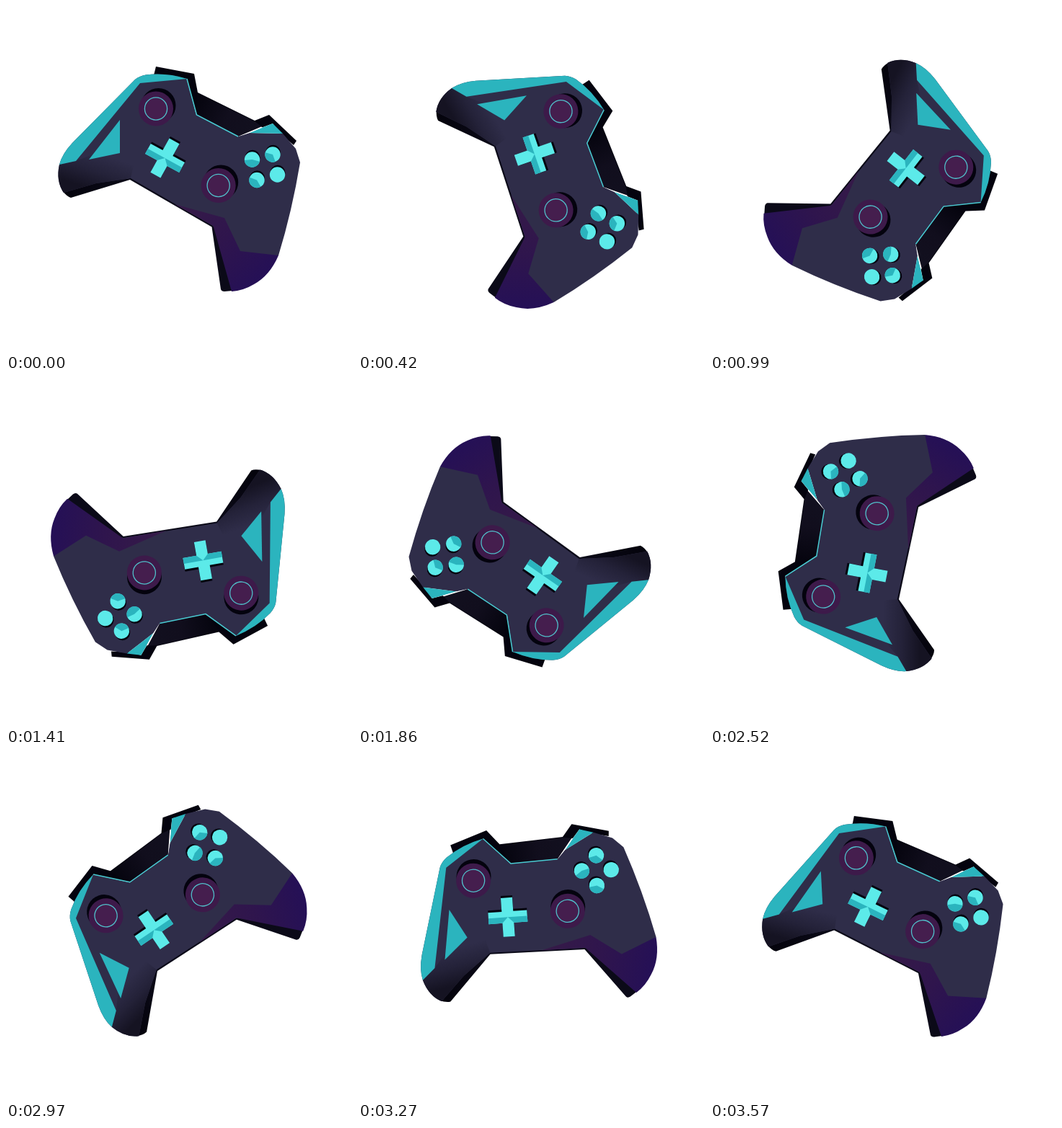
Recreate the animation shown at these times as an HTML page with a canvas. Size 480 by 480 pixels, loop 3600 ms.

```html
<!DOCTYPE html>
<html lang="en">
<head>
<meta charset="utf-8">
<title>Spinning gamepad</title>
<style>
  html, body { margin: 0; width: 100%; height: 100%; overflow: hidden; background: #fff; }
  canvas { display: block; width: 480px; height: 480px; }
</style>
</head>
<body>
<canvas id="stage" width="480" height="480"></canvas>
<script>
const ctx = document.getElementById('stage').getContext('2d');
const LOOP = 3600, STEP = 30, RAD = Math.PI / 180;
const NAVY = '#2f2d49', BLACK = '#04030e', TEAL = '#2bb4be', AQUA = '#5ceae9';

const shape = (d, fill) => {
  ctx.fillStyle = fill;
  ctx.fill(new Path2D(d));
};

const disc = (x, y, r, fill) => {
  ctx.fillStyle = fill;
  ctx.beginPath();
  ctx.arc(x, y, r, 0, Math.PI * 2);
  ctx.fill();
};

const gradient = (x0, y0, x1, y1, ...colors) => {
  const g = ctx.createLinearGradient(x0, y0, x1, y1);
  colors.forEach((c, i) => g.addColorStop(i / (colors.length - 1), c));
  return g;
};

const barFill = gradient(266, 130, 350, 172, '#06050f', '#110e1d', '#12101f');
const gripFill = gradient(128, 204, 112, 252, NAVY, '#242239', '#151322');
const purpleFill = gradient(248, 276, 345, 385, '#351a48', '#2f154d', '#251056');
const backFill = gradient(90, 262, 173, 240, '#05040d', '#0b0a18');

function drawBack() {
  shape('M208 84 L261 94 L266 120 L345 159 L365 151 L403 187 L399 193 L381 177 L370 163 L322 181 L264 151 L251 101 L205 96 Z', BLACK);
  shape('M265 121 L345 160 L354 167 L322 181 L264 151 Z', barFill);
  shape('M78 256 Q84 264 90 266 L172 241 L285.5 306.5 L298 393 Q299 396 303 396 L314 395 L300 300 L180 225 Z', backFill);
}

function drawShell() {
  shape('M74 220 Q78 205 92 190 L179 102 Q185 97 194 95.5 Q222 92 251 101 L264 151 L322 181 L337 176 L384 177 L402 198 L408 217 Q397 284 378 346 L325 360 L287 305 L173 239 L125 246 L80 259 Q69 243 74 220 Z', NAVY);
  shape('M74 220 L97 215 L186 180 L173 239 L125 246 L80 259 Q69 243 74 220 Z', gripFill);
  shape('M234 275 L303 294 L325 340 L378 346 Q366 374 344 386 Q329 395 313 396 L287.5 305 Z', purpleFill);
  shape('M74 220 Q78 205 92 190 L179 102 Q185 97 194 95.5 Q222 92 251 101 L186 107 L97 215 Z', TEAL);
  shape('M158 158 L158 204 L115 213 Z', TEAL);
  shape('M337 176 L370 163 L384 177 Z', TEAL);
  shape('M321 181.5 L354 167.5 L356 168.5 L338 176 Z', '#fff');
  ctx.strokeStyle = '#48cbd2';
  ctx.lineWidth = 1.5;
  ctx.stroke(new Path2D('M251 101 L264.5 151 L322 181'));
}

function drawStick(x, y) {
  disc(x + 3.5, y - 4.5, 24, BLACK);
  disc(x, y, 24, '#3d1a4a');
  disc(x, y, 15.6, '#451e4e');
  ctx.strokeStyle = '#50bfc9';
  ctx.lineWidth = 1.3;
  ctx.beginPath();
  ctx.arc(x, y, 15.6, 0, Math.PI * 2);
  ctx.stroke();
}

function drawPad() {
  const cross = 'M-8 -27 H8 V-8 H27 V8 H8 V27 H-8 V8 H-27 V-8 H-8 Z';
  const place = (x, y, paint) => {
    ctx.save();
    ctx.translate(x, y);
    ctx.rotate(29 * RAD);
    paint();
    ctx.restore();
  };
  place(222, 208.5, () => shape(cross, BLACK));
  place(220.5, 211, () => {
    shape(cross, AQUA);
    shape('M0 0 H-27 V8 H-8 Z M0 0 H27 V8 H8 Z', TEAL);
  });
}

// Angles in degrees bound the shaded sector of the button.
function drawButton(x, y, from, to) {
  disc(x + 0.5, y - 2.7, 10.5, BLACK);
  disc(x, y, 10.7, AQUA);
  if (from === to) return;
  ctx.fillStyle = TEAL;
  ctx.beginPath();
  ctx.moveTo(x, y);
  ctx.arc(x, y, 10.7, from * RAD, to * RAD);
  ctx.fill();
}

function drawGamepad() {
  drawBack();
  drawShell();
  drawStick(208, 142.5);
  drawStick(294.7, 249);
  drawPad();
  drawButton(341.5, 213, 15, 175);
  drawButton(370, 206, 70, 195);
  drawButton(348, 241.5, 60, 200);
  drawButton(376.5, 234, 0, 0);
}

function render(now) {
  const time = Math.floor((now % LOOP) / STEP) * STEP;
  ctx.setTransform(1, 0, 0, 1, 0, 0);
  ctx.fillStyle = '#fff';
  ctx.fillRect(0, 0, 480, 480);
  ctx.translate(240, 240);
  ctx.rotate(time / LOOP * Math.PI * 2);
  ctx.translate(-240, -240);
  drawGamepad();
}

let start;
function tick(now) {
  start ??= now;
  render(now - start);
  requestAnimationFrame(tick);
}
render(0);
requestAnimationFrame(tick);
</script>
</body>
</html>
```
